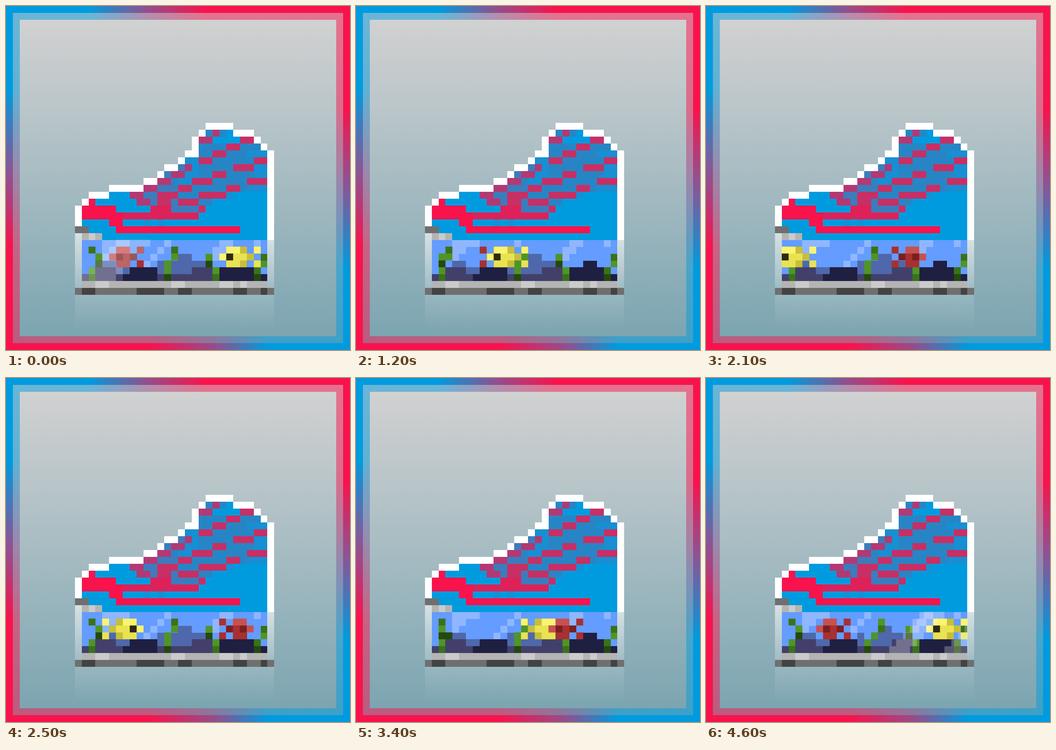
Write an HTML page without scripts that moves like this. It is 748 px wide and 748 px high and loops after 4700 ms.

```html
<!DOCTYPE html>
<html lang="en">
<head>
<meta charset="utf-8">
<title>Aquarium shoe</title>
<style>
html, body { margin: 0; width: 100%; height: 100%; overflow: hidden; background: #a3bac1; }
svg { display: block; width: 100vw; height: 100vh; shape-rendering: crispEdges; }
.px path { fill: none; stroke-width: 1; }

/* 47 ticks of 100 ms; the small delay keeps ticks off the sampling edge */
.anim { animation: 4.7s -5ms infinite step-end; }
.red-left { animation-name: redLeft; }
.red-right { animation-name: redRight; }
.gold-left { animation-name: goldLeft; }
.gold-right { animation-name: goldRight; }
.shine { animation-name: shine; }
.mid { animation-name: mid; }
.bent { animation-name: bent; }
.tall { animation-name: tall; }
.still { animation-name: still; }
.lean { animation-name: lean; }

@keyframes redLeft {
  0% { transform: translate(15px, 0); animation-timing-function: steps(5); }
  10.63% { transform: translate(10px, 0); }
  10.64% { transform: translate(60px, 0); }
  59.57% { transform: translate(34px, 0); animation-timing-function: steps(19); }
  100% { transform: translate(15px, 0); }
}
@keyframes redRight {
  0% { transform: translate(60px, 0); }
  10.64% { transform: translate(11px, 0); animation-timing-function: steps(23); }
  59.56% { transform: translate(34px, 0); }
  59.57%, 100% { transform: translate(60px, 0); }
}
@keyframes goldLeft {
  0% { transform: translate(31px, 0); animation-timing-function: steps(22); }
  46.8% { transform: translate(9px, 0); }
  46.81% { transform: translate(60px, 0); }
  93.62% { transform: translate(34px, 0); animation-timing-function: steps(3); }
  100% { transform: translate(31px, 0); }
}
@keyframes goldRight {
  0% { transform: translate(60px, 0); }
  46.81% { transform: translate(11px, 0); animation-timing-function: steps(10); }
  68.08% { transform: translate(21px, 0); }
  68.09% { transform: translate(22px, 0); animation-timing-function: steps(12); }
  93.61% { transform: translate(34px, 0); }
  93.62%, 100% { transform: translate(60px, 0); }
}
@keyframes shine {
  0%, 27.66%, 55.32%, 85.11% { transform: translate(12px, 0); animation-timing-function: steps(8); }
  17.02%, 44.68%, 72.34% { transform: translate(48px, 0); animation-timing-function: step-end; }
  100% { transform: translate(43.5px, 0); }
}
@keyframes mid { 0%, 100% { opacity: 1; } 17.02% { opacity: 0; } 44.68% { opacity: 1; } 65.96% { opacity: 0; } 85.11% { opacity: 1; } }
@keyframes bent { 0%, 100% { opacity: 0; } 17.02% { opacity: 1; } 44.68% { opacity: 0; } }
@keyframes tall { 0%, 100% { opacity: 0; } 65.96% { opacity: 1; } 85.11% { opacity: 0; } }
@keyframes still { 0%, 100% { opacity: 1; } 87.23% { opacity: 0; } }
@keyframes lean { 0%, 100% { opacity: 0; } 87.23% { opacity: 1; } }
</style>
</head>
<body>
<svg viewBox="0 0 50 50" preserveAspectRatio="none">
  <defs>
    <linearGradient id="sky" x2="0" y2="1">
      <stop stop-color="#d1d1d1"/><stop offset=".3" stop-color="#b8c5c9"/>
      <stop offset="1" stop-color="#7ca5b1"/>
    </linearGradient>
    <linearGradient id="top">
      <stop offset=".24" stop-color="#009bde"/><stop offset=".42" stop-color="#9a4a88"/><stop offset=".58" stop-color="#f8134d"/>
    </linearGradient>
    <linearGradient id="bottom">
      <stop offset=".42" stop-color="#f8134d"/><stop offset=".6" stop-color="#9a4a88"/><stop offset=".76" stop-color="#009bde"/>
    </linearGradient>
    <linearGradient id="left" x2="0" y2="1">
      <stop offset=".24" stop-color="#009bde"/><stop offset=".48" stop-color="#8a5596"/><stop offset=".7" stop-color="#f8134d"/>
    </linearGradient>
    <linearGradient id="right" x2="0" y2="1">
      <stop offset=".3" stop-color="#f8134d"/><stop offset=".52" stop-color="#8a5596"/><stop offset=".76" stop-color="#009bde"/>
    </linearGradient>
    <linearGradient id="fade" x2="0" y2="1">
      <stop stop-color="#fff" stop-opacity=".14"/><stop offset="1" stop-color="#fff" stop-opacity="0"/>
    </linearGradient>
    <linearGradient id="glass" x2="0" y2="1">
      <stop stop-color="#fff" stop-opacity=".6"/><stop offset="1" stop-color="#fff" stop-opacity=".2"/>
    </linearGradient>
    <clipPath id="tank"><path d="M11 34h27v6h-27z"/></clipPath>

    <!-- both fish face left, nose at column 0 -->
    <g id="red">
      <path stroke="#c85050" d="M1 35h2M0 36h1"/>
      <path stroke="#a83030" d="M4 35h1M2 36h1M1 37h2M4 37h1"/>
      <path stroke="#7a1f20" d="M1 36h1m1 0h1"/>
    </g>
    <g id="gold">
      <path stroke="#faf470" d="M1 35h2m2 0h1M0 36h1"/>
      <path stroke="#e9e352" d="M2 36h2M1 37h2m2 0h1"/>
      <path stroke="#c8be38" d="M3 35h1M4 36h1M3 37h1"/>
      <path stroke="#2e2a10" d="M1 36h1"/>
    </g>
  </defs>

  <!-- frame -->
  <path fill="url(#left)" d="M0 0h2v50h-2z"/>
  <path fill="url(#right)" d="M48 0h2v50h-2z"/>
  <path fill="url(#top)" d="M0 0h50l-2 2h-46z"/>
  <path fill="url(#bottom)" d="M0 50h50l-2-2h-46z"/>
  <path fill="url(#sky)" opacity=".5" d="M1 1h48v48h-48z"/>
  <path fill="url(#sky)" d="M2 2h46v46h-46z"/>

  <!-- reflection and glass sides -->
  <path fill="url(#fade)" d="M10 42h29v5h-29z"/>
  <path fill="url(#glass)" d="M10 33h1v8h-1z"/>
  <path fill="url(#glass)" d="M38 34h1v7h-1z"/>

  <!-- shoe -->
  <path fill="#009bde" d="M29 18h4v1h3v1h1v1h1v13H14v-1H12v-1H11v-3h1v-1h3v-1h5v-1h2v-1h1v-1h2v-1h1v-1h2v-3h1z"/>
  <path fill="#fff" d="M38 21h1v13h-1z"/>
  <g class="px" transform="translate(0 .5)">
    <path stroke="#fff" d="M29 17h4M28 18h1m4 0h3M27 19h1m8 0h1M27 20h1m9 0h1M26 21h2M25 22h1M23 23h2M22 24h1M20 25h2M15 26h5M12 27h3M11 28h1M10 29h1M10 30h1M10 31h1"/>
    <path stroke="#178fd2" d="M35 21h3M26 22h2M27 23h1m8 0h2M26 24h2m8 0h2M25 25h2M35 26h3M32 27h1M20 31h1m1 0h1"/>
    <path stroke="#2885c5" d="M29 18h1m1 0h1M28 20h4m2 0h3M28 21h2m2 0h3M30 22h6M28 23h5M28 24h2m2 0h4M24 25h1m5 0h5M27 26h5m2 0h1M25 27h3M28 28h2"/>
    <path stroke="#3c7cbd" d="M25 23h1M23 24h1M22 26h3M20 27h2M21 28h1m2 0h1M24 29h4"/>
    <path stroke="#b43873" d="M30 18h1M28 19h2M26 23h1M24 24h2M22 25h2M20 26h2M18 27h2M19 28h2"/>
    <path stroke="#c72f65" d="M34 19h2M32 20h2M30 21h2M28 22h2m6 0h2M33 23h3M30 24h2M27 25h3m5 0h3M25 26h2m5 0h2M22 27h3m3 0h4M22 28h2m1 0h3M28 29h1"/>
    <path stroke="#de2159" d="M21 29h3M17 30h11"/>
    <path stroke="#f8134d" d="M12 28h1M11 29h5M11 30h6M15 31h2M16 32h18"/>

    <!-- sole -->
    <path stroke="#6f6f6f" d="M10 32h2M10 41h29"/>
    <path stroke="#434343" d="M11 41h2m6 0h4m2 0h2m6 0h2m2 0h1"/>
    <path stroke="#b4b4b4" d="M11 33h3M11 40h27"/>
    <path stroke="#cbcbcb" d="M12 33h1M13 40h2m9 0h2m5 0h2m1 0h1"/>
  </g>

  <!-- aquarium -->
  <g clip-path="url(#tank)">
    <path fill="#649cff" d="M11 34h27v6h-27z"/>
    <g class="px" transform="translate(0 .5)">
      <path stroke="#90b6ff" d="M14 34h4m5 0h1m7 0h2m3 0h1M14 35h2m6 0h1m7 0h2M14 36h1m6 0h1m8 0h1M20 37h1"/>
      <path stroke="#4f68ab" d="M25 36h2M14 37h2m6 0h1m1 0h5M16 38h2m4 0h1m1 0h3"/>
      <path stroke="#42406a" d="M13 38h3m11 0h3M11 39h6m5 0h8"/>
      <path stroke="#1f1f42" d="M33 37h2M18 38h4m9 0h5M17 39h5m9 0h7"/>

      <!-- weeds -->
      <path stroke="#4f9526" d="M12 38h1m10 0h1m6 0h1M29 36h1M37 37h1"/>
      <path stroke="#3a721a" d="M12 39h1m17 0h1M37 36h1M36 38h1"/>
      <path stroke="#24490f" d="M29 37h1M23 39h1m12 0h1"/>
      <g class="anim mid">
        <path stroke="#3a721a" d="M12 35h1"/><path stroke="#4f9526" d="M13 36h1"/><path stroke="#24490f" d="M13 37h1"/>
      </g>
      <g class="anim bent">
        <path stroke="#3a721a" d="M13 35h1"/><path stroke="#4f9526" d="M12 36h2"/><path stroke="#24490f" d="M12 37h1"/>
      </g>
      <g class="anim tall">
        <path stroke="#3a721a" d="M12 35h1"/><path stroke="#4f9526" d="M12 36h1"/><path stroke="#24490f" d="M12 37h2"/>
      </g>
      <g class="anim still">
        <path stroke="#3a721a" d="M24 35h1"/><path stroke="#4f9526" d="M24 36h1M23 37h1"/>
      </g>
      <g class="anim lean">
        <path stroke="#4f9526" d="M25 35h1"/><path stroke="#3a721a" d="M25 36h1"/><path stroke="#4f9526" d="M24 37h1"/>
      </g>

      <!-- fish -->
      <g class="anim red-right"><use href="#red" transform="matrix(-1 0 0 1 5 0)"/></g>
      <g class="anim gold-left"><use href="#gold"/></g>
      <g class="anim gold-right"><use href="#gold" transform="matrix(-1 0 0 1 6 0)"/></g>
      <g class="anim red-left"><use href="#red"/></g>

      <g class="anim shine">
        <path stroke="#fff" stroke-opacity=".25" d="M4 34h5M3 35h5M2 36h5M1 37h5M0 38h5M-1 39h5M-4 34h3M-5 35h3M-6 36h3M-7 37h3M-8 38h3M-9 39h3"/>
      </g>
    </g>
  </g>
</svg>
</body>
</html>
```
